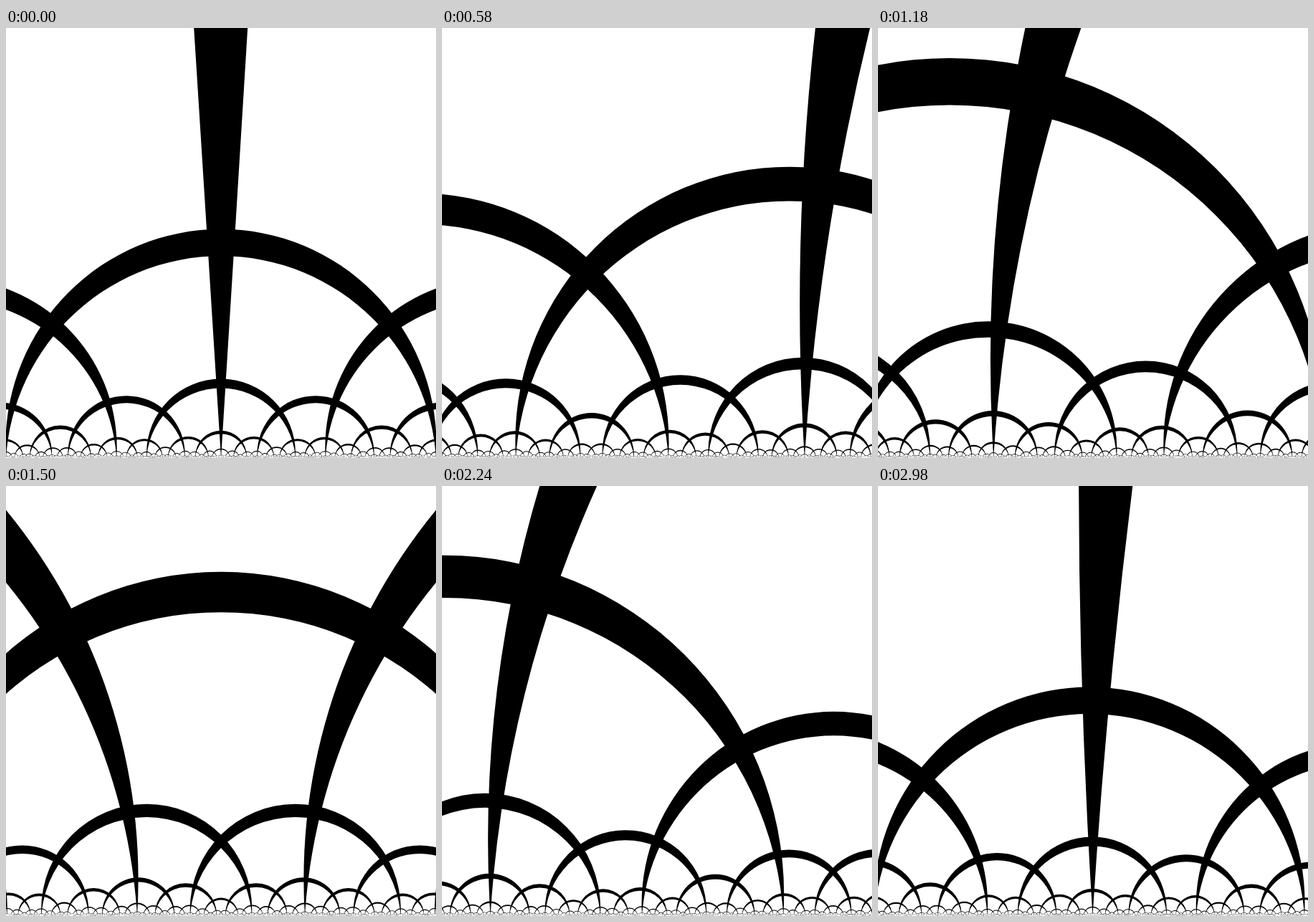
An HTML page with a canvas that plays this animation: 600x600 px, repeating every 3000 ms.

```html
<!DOCTYPE html>
<html>
<head>
<meta charset="utf-8">
<title>Hyperbolic pentagons</title>
<style>
html, body { margin: 0; width: 100%; height: 100%; overflow: hidden; background: #fff; }
canvas { display: block; }
</style>
</head>
<body>
<canvas id="stage" width="600" height="600"></canvas>
<script>
// Order-4 pentagonal tiling in the upper half-plane, turning 90° about one vertex.
// A geodesic is a unit Minkowski vector [p, q, b]:
// (p + q)/2 * |z|² + b * x + (p - q)/2 = 0, with the vertex at z = i.
const ctx = document.getElementById('stage').getContext('2d');
const PERIOD = 3000, STEP = 20;
const PHI = (1 + Math.sqrt(5)) / 2, ROOT = Math.sqrt(PHI);
const UNIT = 300 / (PHI + ROOT);   // height of the fixed vertex in pixels
const BAND = 0.0625;               // sinh of half the band width
const MAX_P = 1000, MIN_RADIUS = 0.45;

const mirrors = [
  [0, 0, 1],
  [0, 1, 0],
  [-ROOT, PHI, 0],
  [-ROOT, 0, PHI],
  [-PHI * ROOT, PHI, PHI]
];

function reflect(n, m) {
  const k = 2 * (n[1] * m[1] + n[2] * m[2] - n[0] * m[0]);
  return n.map((v, i) => v - k * m[i]);
}

// Opposite vectors describe the same line, so the key ignores the sign.
function key(n) {
  const r = n.map(v => Math.round(v * 1000));
  const sign = Math.sign(r.find(v => v !== 0));
  return r.map(v => v * sign + 0).join();
}

function buildLines() {
  const lines = [], seen = new Set();
  const add = n => {
    const k = key(n);
    if (Math.abs(n[0]) > MAX_P || seen.has(k)) return;
    seen.add(k);
    lines.push(n);
  };
  mirrors.forEach(add);
  for (let i = 0; i < lines.length; i++) {
    for (const m of mirrors) add(reflect(lines[i], m));
  }
  return lines;
}

const lines = buildLines();

// Both edges of a band are circles of one radius, shifted up and down.
function drawBand(a, b) {
  if (Math.abs(a) < 1e-4) a = a < 0 ? -1e-4 : 1e-4;
  const scale = UNIT / (2 * Math.abs(a));
  if (scale < MIN_RADIUS) return;
  const r = scale * Math.sqrt(1 + BAND * BAND);
  const x = 300 - UNIT * b / (2 * a);
  if (x + r < 0 || x - r > 600) return;
  ctx.beginPath();
  ctx.arc(x, 600 - scale * BAND, r, 0, 2 * Math.PI);
  ctx.arc(x, 600 + scale * BAND, r, 0, 2 * Math.PI);
  ctx.fill('evenodd');
}

function draw(now) {
  const t = Math.floor((now % PERIOD) / STEP) * STEP;
  const angle = t / PERIOD * Math.PI / 2;
  const c = Math.cos(angle), s = Math.sin(angle);
  ctx.fillStyle = '#fff';
  ctx.fillRect(0, 0, 600, 600);
  ctx.fillStyle = '#000';
  for (const [p, q, b] of lines) {
    drawBand((p + q * c + b * s) / 2, b * c - q * s);
  }
}

function frame() {
  draw(performance.now());
  requestAnimationFrame(frame);
}
frame();
</script>
</body>
</html>
```
